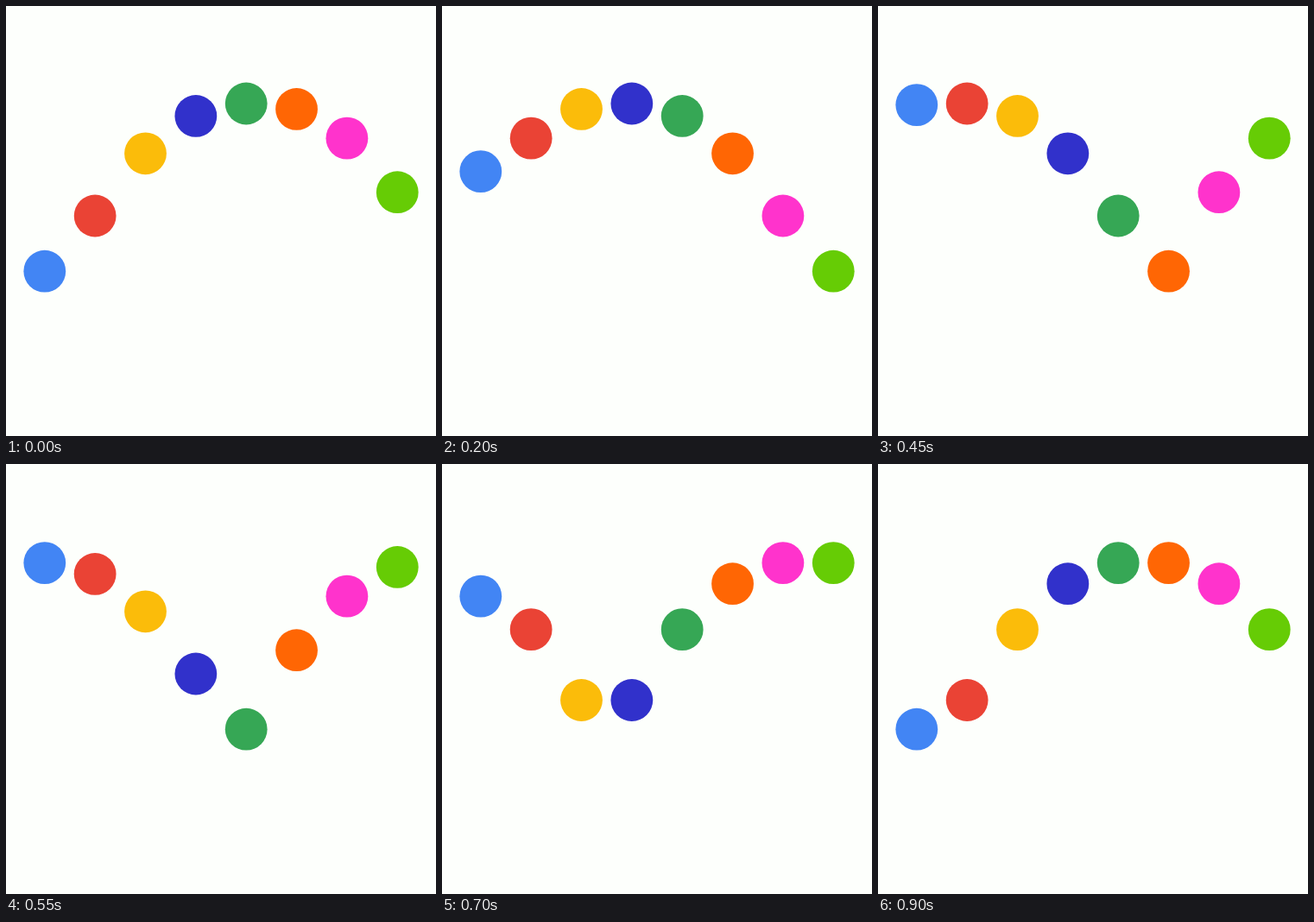
Recreate the animation shown at these times as an HTML page with a canvas. Size 498x498 px, loop 0.95 s.

```html
<!DOCTYPE html>
<html>
<head>
<meta charset="utf-8">
<title>Bouncing balls</title>
<style>
  html, body { margin: 0; width: 100%; height: 100%; overflow: hidden; background: #fdfffc; }
  canvas { display: block; }
</style>
</head>
<body>
<canvas id="stage" width="498" height="498"></canvas>
<script>
const ctx = document.getElementById('stage').getContext('2d');
const colors = ['#4285f4', '#ea4335', '#fbbc0a', '#3131cb', '#36a755', '#ff6604', '#ff33cc', '#66cc05'];
const FRAME = 50, FRAMES = 19, CYCLE = 24;
const RADIUS = 24.4, APEX = 113, GRAVITY = 1.605;

// One step per frame at first, then the motion speeds up to fit the loop.
const stepAt = n => n <= 6 ? n : Math.floor(6 + (n - 6) * 17 / 12);

// Parabolic bounce, holding for one step at the top and at the floor.
function height(step) {
  const s = step % CYCLE;
  const k = s < 12 ? 11 - s : s - 12;
  return APEX + GRAVITY * k * k;
}

const start = performance.now();
function draw(now) {
  const n = Math.floor(Math.max(0, now - start) / FRAME) % FRAMES;
  const step = stepAt(n);
  ctx.clearRect(0, 0, 498, 498);
  colors.forEach((color, i) => {
    const phase = i ? 3 * i - 1 : 0;
    ctx.fillStyle = color;
    ctx.beginPath();
    ctx.arc(44.8 + 58.35 * i, height(step + phase), RADIUS, 0, 2 * Math.PI);
    ctx.fill();
  });
  requestAnimationFrame(draw);
}
draw(start);
</script>
</body>
</html>
```
